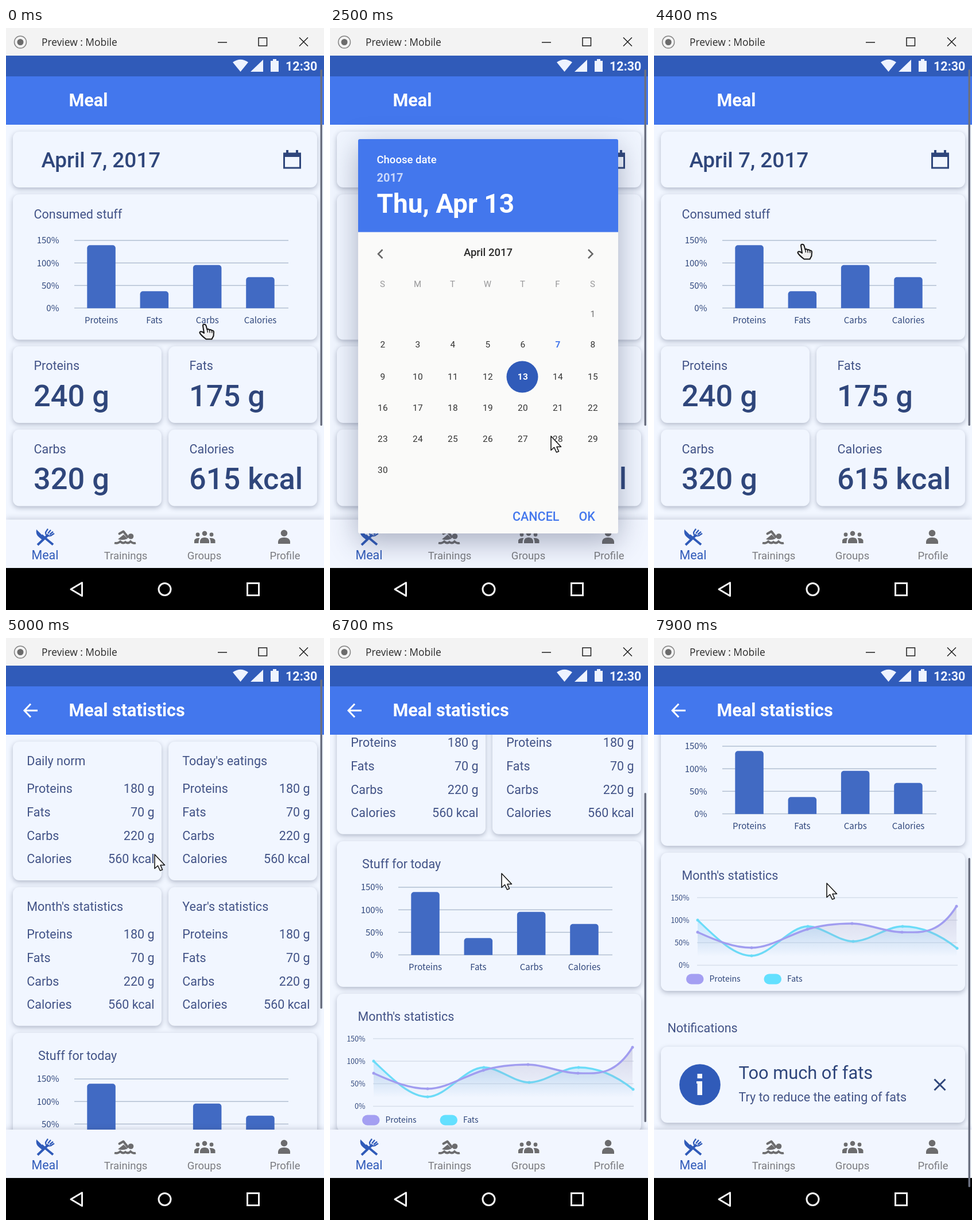
Write an HTML page with a canvas that moves like this. It is 554 px wide and 1011 px high and loops after 8 s.

```html
<!DOCTYPE html>
<html lang="en">
<head>
<meta charset="utf-8">
<title>Meal tracker</title>
<style>
html, body { margin: 0; width: 100%; height: 100%; overflow: hidden; background: #f1f6ff; }
canvas { display: block; width: 554px; height: 1011px; }
</style>
</head>
<body>
<canvas id="stage"></canvas>
<script>
const W = 554, H = 1011, LOOP = 8000, STEP = 100;
const DIALOG_OPEN = 1900, DIALOG_CLOSE = 3500, STATS_OPEN = 4900;
const PAGE = '#f1f6ff', BLUE = '#4377ed', DEEP = '#305bb9', BAR = '#416ac3',
  INK = '#2f467b', LABEL = '#425387', GREY = '#6c6c6e', LINE = '#b3c0d2';
const ROBOTO = 'Roboto, sans-serif';
const CHART_FONT = '"Noto Sans CJK SC", "Noto Sans CJK JP", "Noto Sans CJK", "Noto Sans", sans-serif';

const canvas = document.getElementById('stage');
const ctx = canvas.getContext('2d');
const dpr = window.devicePixelRatio || 1;
canvas.width = W * dpr;
canvas.height = H * dpr;

// Keys: time, then values
const CURSOR = [
  [100, 346, 515], [1400, 503, 241], [1900, 503, 241], [2500, 385, 709],
  [2700, 382, 782], [3200, 367, 843], [3500, 367, 843], [4300, 259, 376],
  [5000, 259, 376], [5500, 282, 378], [5900, 282, 378], [6700, 299, 409], [7500, 301, 426]
];
const SCROLL = [[6000, 0, 0], [6700, 333, 197], [7200, 578, 310]];

const smooth = p => p * p * (3 - 2 * p);
const linear = p => p;

function sample(keys, t, ease) {
  if (t <= keys[0][0]) return keys[0].slice(1);
  for (let i = 1; i < keys.length; i++) {
    const a = keys[i - 1], b = keys[i];
    if (t <= b[0]) {
      const p = ease((t - a[0]) / (b[0] - a[0]));
      return a.slice(1).map((v, k) => v + (b[k + 1] - v) * p);
    }
  }
  return keys[keys.length - 1].slice(1);
}

function text(str, x, y, size, color, { weight = 400, align = 'left', family = ROBOTO, spacing = 0 } = {}) {
  ctx.font = `${weight} ${size}px ${family}`;
  ctx.letterSpacing = spacing + 'px';
  ctx.textAlign = align;
  ctx.fillStyle = color;
  ctx.fillText(str, x, y);
}

function rect(x, y, w, h, color) {
  ctx.fillStyle = color;
  ctx.fillRect(x, y, w, h);
}

function rounded(x, y, w, h, r, color) {
  ctx.beginPath();
  ctx.roundRect(x, y, w, h, r);
  ctx.fillStyle = color;
  ctx.fill();
}

function disc(x, y, r, color) {
  ctx.beginPath();
  ctx.arc(x, y, r, 0, Math.PI * 2);
  ctx.fillStyle = color;
  ctx.fill();
}

function fill(d, color) {
  ctx.fillStyle = color;
  ctx.fill(new Path2D(d));
}

function stroke(d, color, width, cap = 'butt') {
  ctx.strokeStyle = color;
  ctx.lineWidth = width;
  ctx.lineCap = cap;
  ctx.stroke(new Path2D(d));
}

function at(x, y, draw) {
  ctx.save();
  ctx.translate(x, y);
  draw();
  ctx.restore();
}

function shadowed(color, blur, dy, draw) {
  ctx.save();
  ctx.shadowColor = color;
  ctx.shadowBlur = blur * dpr;
  ctx.shadowOffsetY = dy * dpr;
  draw();
  ctx.restore();
}

function card(x, y, w, h) {
  shadowed('rgba(50,60,90,.33)', 9, 3, () => rounded(x, y, w, h, 11, PAGE));
}

function windowBar() {
  rect(0, 0, W, 48, '#f3f3f3');
  ctx.beginPath();
  ctx.arc(25, 24.5, 10.5, 0, Math.PI * 2);
  ctx.strokeStyle = '#858585';
  ctx.lineWidth = 1.5;
  ctx.stroke();
  disc(25, 24.5, 5.5, '#6b6b6b');
  text('Preview : Mobile', 62, 31, 17.4, '#2b2b2b', { family: '"Open Sans", sans-serif' });
  stroke('M369 25H385M440 17H454.500V31H440ZM511 16.500L526 31.500M526 16.500L511 31.500', '#1c1c1c', 1.5);
}

function appHeader(title, back) {
  rect(0, 48, W, 36, DEEP);
  fill('M395 59.500Q408.500 50 422 59.500L408.500 76Z', '#eef3ff');
  fill('M426 76L448 55V76Z', '#eef3ff');
  fill('M461 57H465V54H471V57H475V76H461Z', '#eef3ff');
  text('12:30', 487, 74, 21.5, '#eef3ff', { weight: 700 });
  rect(0, 84, W, 84, BLUE);
  if (back) stroke('M55 126H32.500M43 114.500L32 126L43 137.500', '#fff', 3);
  text(title, 109.5, 135.5, 30.6, '#fff', { weight: 700 });
}

function mealIcon() {
  fill('M53 871Q51 880 58 885L63 889L67 885Z', DEEP);
  stroke('M62 881L82 897.500M55 898L74 880', DEEP, 4);
  stroke('M73 870L69 876Q69 884 78 882L84 878M78 872L73 878M82 875L76 880', DEEP, 2.3);
}

function swimIcon() {
  disc(217.5, 883, 4.8, GREY);
  fill('M195 888L205 880L212 887Q203 891 195 888Z', GREY);
  ctx.lineJoin = 'round';
  stroke('M197.500 878.500L204.500 874.500L212 884', GREY, 4, 'round');
  ctx.lineJoin = 'miter';
  stroke('M189 894.500Q195 896 199 892Q204 896.500 208 893Q213 896.500 217 892Q221 896 226 894.500', GREY, 3.8);
}

function groupIcon() {
  for (const [x, y, r] of [[334, 880, 3.4], [346, 878, 4.3], [358, 880, 3.4]]) disc(x, y, r, GREY);
  fill('M338 895V891Q339 885 346 885Q353 885 354 891V895Z', GREY);
  fill('M328 895V890Q329.500 885.500 337.500 886Q335.500 889 335.500 895ZM364.500 895V890Q363 885.500 354.500 886Q356.500 889 356.500 895Z', GREY);
}

function bottomNav() {
  shadowed('rgba(50,60,90,.2)', 9, -2, () => rect(0, 854, W, 84, '#f2f6ff'));
  mealIcon();
  swimIcon();
  groupIcon();
  disc(484.5, 877.5, 5.8, GREY);
  fill('M474 896V892Q475 885 484.500 885Q494 885 495 892V896Z', GREY);
  text('Meal', 68, 923, 21.5, DEEP, { align: 'center' });
  text('Trainings', 208.5, 923, 18.5, '#7b7c80', { align: 'center' });
  text('Groups', 345.5, 923, 18.5, '#7b7c80', { align: 'center' });
  text('Profile', 486, 923, 18.5, '#7b7c80', { align: 'center' });
  rect(0, 938, W, 73, '#000');
  ctx.lineJoin = 'round';
  stroke('M113 975L132.500 963.500V986.500Z', '#f4f4f4', 3);
  ctx.lineJoin = 'miter';
  ctx.beginPath();
  ctx.arc(276.5, 975, 10.5, 0, Math.PI * 2);
  ctx.stroke();
  stroke('M420.500 964.500H440.500V985.500H420.500Z', '#f4f4f4', 3);
}

function percentAxis(top, x0, x1, labelX, size, color) {
  ['150%', '100%', '50%', '0%'].forEach((label, i) => {
    const y = top + i * 39.15;
    rect(x0, y - 0.75, x1 - x0, 1.5, color);
    text(label, labelX, y + size * 0.36, size, INK, { weight: 500, align: 'right', family: CHART_FONT });
  });
}

function barChart(top) {
  percentAxis(top, 119, 492, 92.5, 15, LINE);
  [['Proteins', 109.5], ['Fats', 29.5], ['Carbs', 75], ['Calories', 54]].forEach(([name, h], i) => {
    const x = 141.3 + i * 92.3;
    rounded(x, top + 117.8 - h, 49.5, h, [5, 5, 0, 0], BAR);
    text(name, x + 24.8, top + 143.5, 15, INK, { weight: 500, align: 'center', family: CHART_FONT });
  });
}

// Points: x, y, slope
const FATS = [[76, 39, 0.95], [170, 101, 0], [268, 50, 0], [347, 76, 0], [433, 50, 0], [528, 88, 0.8]];
const PROTEINS = [[76, 60, 0.45], [170, 87, 0], [267, 55, -0.3], [345, 45, 0], [432, 60, 0], [527, 15, -1.6]];

function curve(points, color, tint) {
  const path = new Path2D();
  path.moveTo(points[0][0], points[0][1]);
  for (let i = 1; i < points.length; i++) {
    const [x0, y0, m0] = points[i - 1], [x1, y1, m1] = points[i];
    const d = (x1 - x0) / 3;
    path.bezierCurveTo(x0 + d, y0 + m0 * d, x1 - d, y1 - m1 * d, x1, y1);
  }
  const area = new Path2D(path);
  area.lineTo(points[points.length - 1][0], 117);
  area.lineTo(76, 117);
  area.closePath();
  const fade = ctx.createLinearGradient(0, 15, 0, 102);
  fade.addColorStop(0, `rgba(${tint},.38)`);
  fade.addColorStop(1, `rgba(${tint},0)`);
  ctx.fillStyle = fade;
  ctx.fill(area);
  ctx.strokeStyle = color;
  ctx.lineWidth = 3.4;
  ctx.stroke(path);
  for (const [x, y] of points) disc(x, y, 2.5, color);
}

function lineChart(top) {
  percentAxis(top, 75, 529, 61.5, 12.5, '#d6deea');
  at(0, top, () => {
    curve(FATS, '#6bdcf8', '90,195,250');
    curve(PROTEINS, '#a19df0', '165,160,195');
  });
  [['Proteins', 56, '#a49ff2'], ['Fats', 191.5, '#63e0ff']].forEach(([name, x, color]) => {
    rounded(x, top + 132.5, 30.5, 18, 9, color);
    text(name, x + 40.5, top + 146, 14, INK, { weight: 500, family: CHART_FONT });
  });
}

function calendarIcon() {
  stroke('M484.500 218H512.500V243H484.500Z', INK, 3);
  rect(484, 217, 29, 7, INK);
  rect(488, 212, 4, 6, INK);
  rect(505, 212, 4, 6, INK);
}

function mealPage() {
  card(12, 180, 530, 97);
  text('April 7, 2017', 61.5, 242, 36.9, INK, { weight: 500 });
  calendarIcon();
  card(12, 289, 530, 252.5);
  text('Consumed stuff', 48.5, 330.5, 21.5, LABEL);
  barChart(369);
  const facts = [['Proteins', '240 g'], ['Fats', '175 g'], ['Carbs', '320 g'], ['Calories', '615 kcal']];
  facts.forEach(([name, amount], i) => {
    const dx = (i % 2) * 271, y = 553 + (i >> 1) * 144.5;
    card(12 + dx, y, 259, 133);
    text(name, 48.5 + dx, y + 41, 21.5, LABEL);
    text(amount, 48 + dx, y + 103.5, 52.3, INK, { weight: 500 });
  });
}

function statsPage() {
  const rows = [['Proteins', '180 g'], ['Fats', '70 g'], ['Carbs', '220 g'], ['Calories', '560 kcal']];
  ['Daily norm', "Today's eatings", "Month's statistics", "Year's statistics"].forEach((title, i) => {
    const dx = (i % 2) * 271, y = 180 + (i >> 1) * 252.8;
    card(12 + dx, y, 259, 241);
    text(title, 36.3 + dx, y + 41, 21.5, LABEL);
    rows.forEach(([name, amount], k) => {
      const base = y + 89.3 + k * 40.7;
      text(name, 36.3 + dx, base, 21.5, LABEL);
      text(amount, 258.5 + dx, base, 21.5, LABEL, { align: 'right' });
    });
  });
  card(12, 686, 530, 253);
  text('Stuff for today', 56, 732.5, 21.5, LABEL);
  barChart(766);
  card(12, 951, 530, 240);
  text("Month's statistics", 48.5, 997.5, 21.5, LABEL);
  lineChart(1029);
  text('Notifications', 23.5, 1262.5, 21.5, LABEL);
  card(12, 1288, 530, 132);
  disc(80, 1354, 35.8, DEEP);
  rect(75.5, 1335, 8.5, 8, '#f4f7ff');
  fill('M74 1348H84V1372H75.500V1352H74Z', '#f4f7ff');
  text('Too much of fats', 147.5, 1343.5, 30.8, INK);
  text('Try to reduce the eating of fats', 147.5, 1382.5, 21.5, LABEL);
  stroke('M488.500 1344.500L507.500 1363.500M507.500 1344.500L488.500 1363.500', INK, 3);
}

function dialog() {
  shadowed('rgba(45,55,90,.38)', 50, 14, () => rounded(49, 193, 453, 685, 3, '#fafaf9'));
  rounded(49, 193, 453, 161.5, [3, 3, 0, 0], BLUE);
  text('Choose date', 81.5, 234.5, 18.5, '#fff', { weight: 500 });
  text('2017', 81.5, 266.5, 20, '#c9d8fb', { weight: 700 });
  text('Thu, Apr 13', 81.5, 320.5, 46, '#fff', { weight: 700 });
  stroke('M91.500 385L84 392.500L91.500 400M450 385L457.500 392.500L450 400', '#666', 2.5);
  text('April 2017', 275.5, 395.5, 18.5, '#2a2a2a', { weight: 500, align: 'center' });
  const column = i => 91.5 + i * 61;
  [...'SMTWTFS'].forEach((d, i) => text(d, column(i), 449.5, 15, '#98989a', { align: 'center' }));
  disc(335, 606, 27.5, DEEP);
  const rowY = [497, 550, 605.5, 660, 714, 768];
  for (let day = 1; day <= 30; day++) {
    const cell = day + 5;
    const color = day === 13 ? '#fff' : day === 7 ? BLUE : day === 1 ? '#737373' : '#333';
    const weight = day === 13 || day === 7 ? 700 : 400;
    text(String(day), column(cell % 7) + 0.5, rowY[Math.floor(cell / 7)] + 5.3, 15.4, color,
      { weight, align: 'center', spacing: 0.4 });
  }
  text('CANCEL', 318, 856, 21.5, BLUE, { weight: 500 });
  text('OK', 433.5, 856, 21.5, BLUE, { weight: 500 });
}

function pointer(x, y, hand) {
  at(x, y, () => {
    ctx.lineJoin = 'round';
    const shape = hand
      ? 'M-3 2C-3 -1 1.500 -1 2.500 2L4.500 9C6 7.500 8 8 8.500 10C10 8.500 12 9 12.500 11C14 10 16 11 16 13L15.500 20L12.500 25.500H2.500C-2 22 -7 18 -8.500 14.500C-8.500 11.500 -5 11.500 -1 15Z'
      : 'M0 0V24.500L5.500 19.500L9.500 28L13.500 26.500L10 18.500H17.500Z';
    fill(shape, hand ? '#f0f0f0' : '#fff');
    stroke(shape, '#161616', hand ? 2 : 1.6);
    if (hand) stroke('M4.500 9L5.500 14M8.500 10.500L9.300 14.500M12.500 11.500L13 15', '#161616', 1.3);
    ctx.lineJoin = 'miter';
  });
}

function draw(t) {
  const stats = t >= STATS_OPEN;
  const showDialog = t >= DIALOG_OPEN && t < DIALOG_CLOSE;
  const [offset, thumb] = sample(SCROLL, t, linear);
  ctx.setTransform(dpr, 0, 0, dpr, 0, 0);
  rect(0, 0, W, H, PAGE);
  ctx.save();
  ctx.beginPath();
  ctx.rect(0, 168, W, 686);
  ctx.clip();
  if (stats) at(0, -offset, statsPage);
  else mealPage();
  ctx.restore();
  bottomNav();
  windowBar();
  appHeader(stats ? 'Meal statistics' : 'Meal', stats);
  if (showDialog) dialog();
  rounded(547.5, 72 + (stats ? thumb : 0), 3.5, stats ? 572 : 619, 1.7, '#6b7080');
  const [x, y] = sample(CURSOR, t, smooth);
  const hand = t < DIALOG_OPEN || (t >= 3000 && !stats);
  pointer(x, y, hand);
}

function tick() {
  const t = performance.now() % LOOP;
  draw(Math.floor(t / STEP) * STEP);
  requestAnimationFrame(tick);
}
tick();
</script>
</body>
</html>
```
